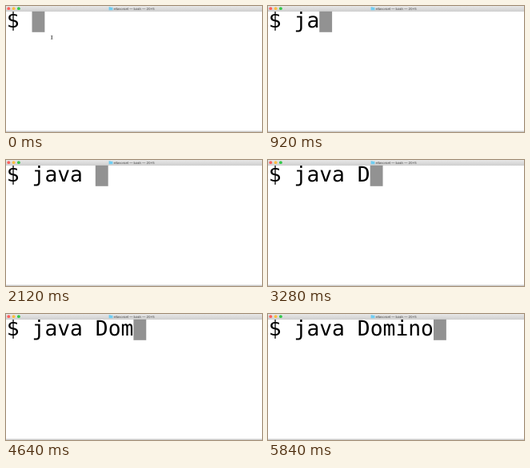
Recreate the animation shown at these times as an HTML page. Size 320 by 158 pixels, loop 8000 ms.

```html
<!DOCTYPE html>
<html lang="en">
<head>
<meta charset="utf-8">
<title>Terminal typing</title>
<style>
  html, body { margin: 0; width: 100%; height: 100%; overflow: hidden; background: #fff; }
  svg { display: block; width: 100%; height: 100%; }
  text { white-space: pre; text-rendering: geometricPrecision; }
  .title { font: 4.1px Inter, Roboto, sans-serif; fill: #444; }
  .shell { font: 26.35px "DejaVu Sans Mono", monospace; fill: #000; }
</style>
</head>
<body>
<svg viewBox="0 0 320 158">
  <defs>
    <linearGradient id="bar" x2="0" y2="1">
      <stop offset="0" stop-color="#e8e8e8"/>
      <stop offset="1" stop-color="#d0d0d0"/>
    </linearGradient>
  </defs>
  <rect width="320" height="158" fill="#fff"/>

  <rect width="320" height="6.5" fill="url(#bar)"/>
  <path d="M0 6.6H320" stroke="#b4b4b4" stroke-width=".5"/>
  <circle cx="3.3" cy="3.2" r="1.9" fill="#fc605c"/>
  <circle cx="9.6" cy="3.2" r="1.9" fill="#fdbc40"/>
  <circle cx="15.9" cy="3.2" r="1.9" fill="#34c84a"/>
  <path d="M128.6 1.2h1.8l.5.6h2.5v3.4h-4.8z" fill="#6fcdf2"/>
  <text class="title" x="134.5" y="4.7">ellavorset — bash — 20×5</text>

  <rect id="cursor" y="6.8" width="15.86" height="26" fill="#929292"/>
  <text class="shell" id="line" x="0.8" y="26.6"></text>
  <path id="pointer" d="M56.2 37.2q1.1 0 1.1.7v3q0 .7-1.1.7M58.4 37.2q-1.1 0-1.1.7v3q0 .7 1.1.7"
        fill="none" stroke="#333" stroke-width=".6"/>
  <path d="M0 157.2H320" stroke="#b8b8b8" stroke-width="1"/>
</svg>
<script>
  const LOOP = 8000, CELL = 15.86, LEFT = 0.8;
  const PROMPT = "$ ", COMMAND = "java Domino";
  const keyTimes = [720, 920, 1600, 1800, 2120, 3280, 4200, 4640, 4960, 5240, 5840];
  const [cursor, line, pointer] =
    ["cursor", "line", "pointer"].map(id => document.getElementById(id));
  const start = performance.now();

  function draw(now) {
    const time = Math.max(0, now - start) % LOOP;
    const typed = keyTimes.filter(key => key <= time).length;
    line.textContent = PROMPT + COMMAND.slice(0, typed);
    cursor.setAttribute("x", LEFT + (PROMPT.length + typed) * CELL);
    // The mouse pointer hides on the first keystroke.
    pointer.setAttribute("visibility", typed ? "hidden" : "visible");
    requestAnimationFrame(draw);
  }
  draw(start);
</script>
</body>
</html>
```
